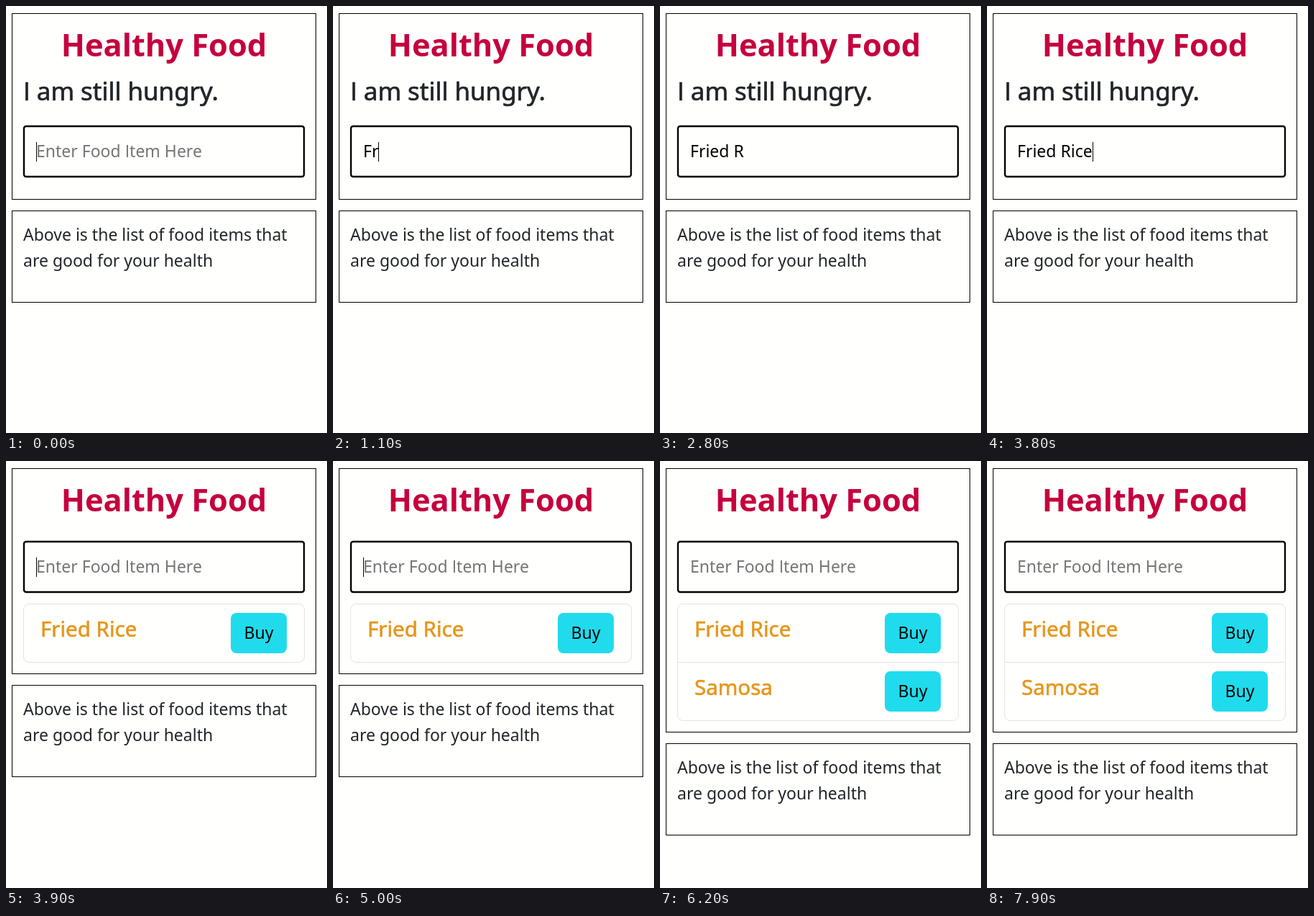
An HTML page for the animation above (8 s loop, 447 by 593 pixels).

```html
<!DOCTYPE html>
<html lang="en">
<head>
<meta charset="utf-8">
<title>Healthy Food</title>
<style>
  html, body { margin: 0; width: 100%; height: 100%; overflow: hidden; background: #fffffd; }
  svg { display: block; width: 447px; height: 593px; }
  text { font: 23px "Noto Sans", "Open Sans", sans-serif; fill: #212529; white-space: pre; }
  .plain { font-family: "Open Sans", sans-serif; }
  .title { font-size: 43.4px; font-weight: 700; fill: #c5003e; text-anchor: middle; }
  .hungry { font-size: 34.9px; stroke: #212529; stroke-width: .7; }
  .item { font-size: 29.5px; fill: #e5961c; stroke: #e5961c; stroke-width: .6; }
  .buy { text-anchor: middle; fill: #000; }
  .box { fill: none; stroke: #000; }
  .list { fill: none; stroke: #e1e4e8; }
  .hint { fill: #757575; }
  #typed { fill: #000; }
</style>
</head>
<body>
<svg viewBox="0 0 447 593">
  <rect id="card" class="box" x="8.5" y="10.5" width="423"/>
  <text class="title" x="220" y="69.5">Healthy Food</text>
  <text id="hungry" class="hungry" x="24" y="131"><tspan class="plain">I</tspan> am still hungry.</text>

  <g id="field">
    <rect x="25" y="1" width="390" height="70" rx="3" fill="none" stroke="#000" stroke-width="2.4"/>
    <text id="hint" class="hint" x="42" y="44">Enter Food <tspan class="plain">I</tspan>tem Here</text>
    <text id="typed" x="42" y="44"></text>
    <rect id="caret" y="23" width="1" height="27"/>
  </g>

  <rect id="list" class="list" x="24.5" y="198.5" width="391" rx="7.5"/>
  <g id="rows"></g>

  <g id="note">
    <rect class="box" x="8.5" y=".5" width="423" height="127"/>
    <text x="24" y="42">Above is the list of food items that</text>
    <text x="24" y="78">are good for your health</text>
  </g>
</svg>
<script>
const LOOP = 8000, ROW = 81;
const $ = id => document.getElementById(id);

// One time per typed letter, then the time of Enter
const entries = [
  { name: 'Fried Rice', keys: [1000, 1100, 1900, 2000, 2300, 2400, 2500, 2900, 3000, 3200], enter: 3900 },
  { name: 'Samosa', keys: [5200, 5300, 5400, 5500, 5600, 5700], enter: 6200 }
];
// The caret is on at first and flips at each of these times
const flips = [200, 500, 800, 1000, 1400, 1600, 2800, 2900, 3500, 3800,
  4100, 4400, 4700, 5000, 6000, 6400, 6700, 7000, 7300, 7600, 7900];

const passed = (times, t) => times.filter(x => x <= t).length;
const show = (el, on) => el.setAttribute('visibility', on ? 'visible' : 'hidden');
const moveTo = (el, y) => el.setAttribute('transform', `translate(0 ${y})`);

$('rows').innerHTML = entries.map(({ name }, i) => `
  <g transform="translate(0 ${198 + i * ROW})">
    ${i ? '<path class="list" d="M25 .5H415"/>' : ''}
    <text class="item" x="48" y="46">${name}</text>
    <rect x="313" y="13" width="78" height="56" rx="8" fill="#20dbec"/>
    <text class="buy" x="352" y="49">Buy</text>
  </g>`).join('');
const rows = [...$('rows').children];

function draw(t) {
  const count = passed(entries.map(e => e.enter), t);
  const entry = entries[count];
  const text = entry ? entry.name.slice(0, passed(entry.keys, t)) : '';
  const cardHeight = count ? 204 + count * ROW : 258;

  $('card').setAttribute('height', cardHeight);
  moveTo($('note'), cardHeight + 26);
  moveTo($('field'), count ? 111 : 166);
  show($('hungry'), !count);
  show($('list'), count);
  $('list').setAttribute('height', count * ROW);
  rows.forEach((row, i) => show(row, i < count));

  $('typed').textContent = text;
  show($('hint'), !text);
  $('caret').setAttribute('x', 42 + (text ? Math.round($('typed').getComputedTextLength()) : 0));
  show($('caret'), passed(flips, t) % 2 === 0);
}

const begin = performance.now();
function tick() {
  draw((performance.now() - begin) % LOOP);
  requestAnimationFrame(tick);
}
tick();
</script>
</body>
</html>
```
